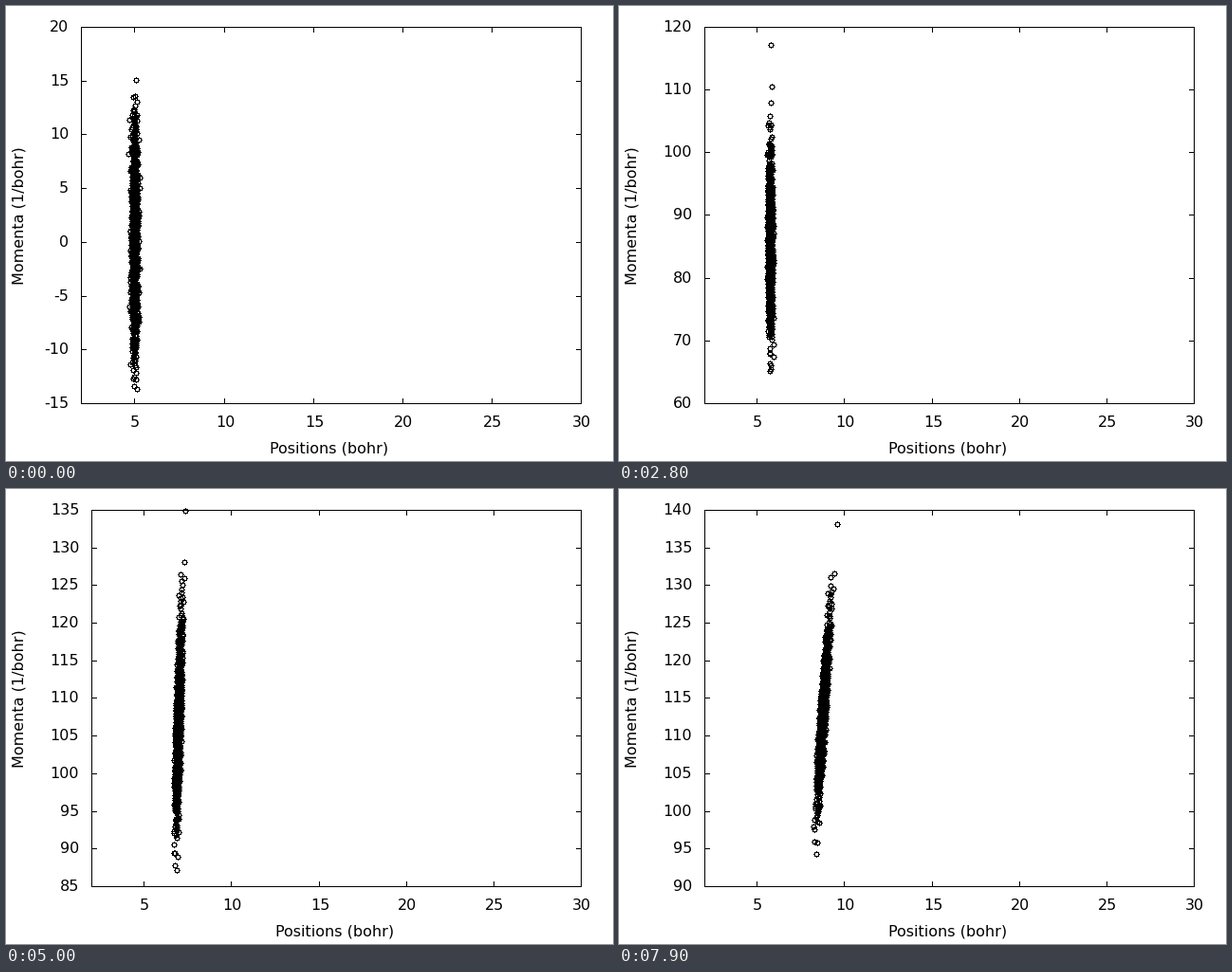
Animation, 640 px wide and 480 px high, one loop 8000 ms. Source, as a matplotlib script:

```python
import numpy as np
import matplotlib.pyplot as plt
from matplotlib.animation import FuncAnimation

W, H, DPI = 640, 480, 100
FRAMES, STEP_MS = 80, 100
RIGHT, TOP, BOTTOM = 606, 22, 419
XMIN, XMAX = 2, 30
XTICKS = range(5, 31, 5)
TIC = 6

# Wave packet pushed down an exponential wall: F = F0 exp(-B (x - 5)), dx/dt = K p
B, F0, K = 1.09, 3.95, 0.00056
COUNT = 1000

# stragglers at the rim of the packet: (position, momentum)
RIM = np.array([
    (4.643, 8.2), (4.735, 11.4), (4.76, 9.8), (4.735, -6), (4.75, -0.8),
    (5.08, 15.1), (4.92, 13.5), (5.05, 13.6), (5.13, 13.0), (4.95, 12.3),
    (5.25, 9.5), (5.29, 6), (5.315, 5), (5.28, -2.5), (5.25, -4.7),
    (5.245, -7.4), (5.11, -13.7), (5.0, -13.4), (5.06, -12.8),
    (4.90, -12.7), (4.77, -11.4), (4.85, -9.8),
])


def make_packet():
    rng = np.random.default_rng(12)
    z = rng.normal(size=(2 * COUNT, 2))
    z = z[(np.hypot(z[:, 0], z[:, 1]) < 2.7) & (abs(z[:, 0]) < 2.4)]
    core = z[:COUNT - len(RIM)] * (0.1, 5) + (5, 0)
    return np.vstack([core, RIM]).T


X0, P0 = make_packet()
PEND = np.sqrt(P0**2 + 2 * F0 / (B * K) * np.exp(-B * (X0 - 5)))
PHASE = np.arctanh(P0 / PEND)


def packet_at(t):
    a = B * K * PEND / 2 * t + PHASE
    return X0 + 2 / B * np.log(np.cosh(a) / np.cosh(PHASE)), PEND * np.tanh(a)


def tick_step(span):
    power = 10.0 ** np.floor(np.log10(span))
    slots = 20 * power / span
    for limit, unit in ((20, 0.1), (10, 0.2), (4, 0.5), (2, 1)):
        if slots > limit:
            return unit * power
    return 2 * power


# hard-edged small circle with one spike on each side
dy, dx = np.mgrid[-3:4, -3:4]
far = np.maximum(abs(dx), abs(dy))
near = np.minimum(abs(dx), abs(dy))
ring = (far == 2) | ((far == 3) & (near == 0))
RING_X, RING_Y = dx[ring], dy[ring]

fig = plt.figure(figsize=(W / DPI, H / DPI), dpi=DPI, facecolor="white")
ax = fig.add_axes([0, 0, 1, 1])
ax.axis("off")
image = ax.imshow(np.ones((H, W)), cmap="gray", vmin=0, vmax=1,
                  interpolation="nearest", aspect="auto")
ax.set_xlim(-0.5, W - 0.5)
ax.set_ylim(H - 0.5, -0.5)


def label(x, y, text="", ha="center", **kw):
    return ax.text(x, y, text, ha=ha, va="baseline", color="black",
                   family="DejaVu Sans", size=16 * 72 / DPI, **kw)


xlabels = [label(0, 443, str(v)) for v in XTICKS]
ylabels = [label(0, 0, ha="right") for _ in range(16)]
xtitle = label(0, 470.5, "Positions (bohr)")
label(18.5, 221, "Momenta (1/bohr)", rotation=90, rotation_mode="anchor")


def draw(i):
    x, p = packet_at(i)
    step = tick_step(p.max() - p.min())
    lo = np.floor(p.min() / step) * step
    hi = np.ceil(p.max() / step) * step
    ticks = np.arange(lo, hi + step / 2, step)
    left = 90 if hi >= 100 else 79

    def col(v):
        return np.floor(left + (v - XMIN) / (XMAX - XMIN) * (RIGHT - left)
                        + 0.5).astype(int)

    def row(v):
        return BOTTOM - np.floor((v - lo) / (hi - lo) * (BOTTOM - TOP)
                                 + 0.5).astype(int)

    px = np.ones((H, W))
    px[[TOP, BOTTOM], left:RIGHT + 1] = 0
    px[TOP:BOTTOM + 1, [left, RIGHT]] = 0

    for text, v in zip(xlabels, XTICKS):
        c = col(v)
        px[TOP:TOP + TIC, c] = 0
        px[BOTTOM - TIC + 1:BOTTOM + 1, c] = 0
        text.set_x(c + 0.5)

    for text in ylabels:
        text.set_text("")
    for text, v in zip(ylabels, ticks):
        r = row(v)
        px[r, left:left + TIC] = 0
        px[r, RIGHT - TIC + 1:RIGHT + 1] = 0
        text.set_text(str(int(round(v))))
        text.set_position((left - 13.3, r + 4.5))

    xtitle.set_x((left + RIGHT) / 2 - 2)
    px[row(p)[:, None] + RING_Y, col(x)[:, None] + RING_X] = 0
    image.set_data(px)
    return [image, xtitle, *xlabels, *ylabels]


anim = FuncAnimation(fig, draw, frames=FRAMES, interval=STEP_MS,
                     repeat=True, repeat_delay=0, blit=False)
plt.show()
```
